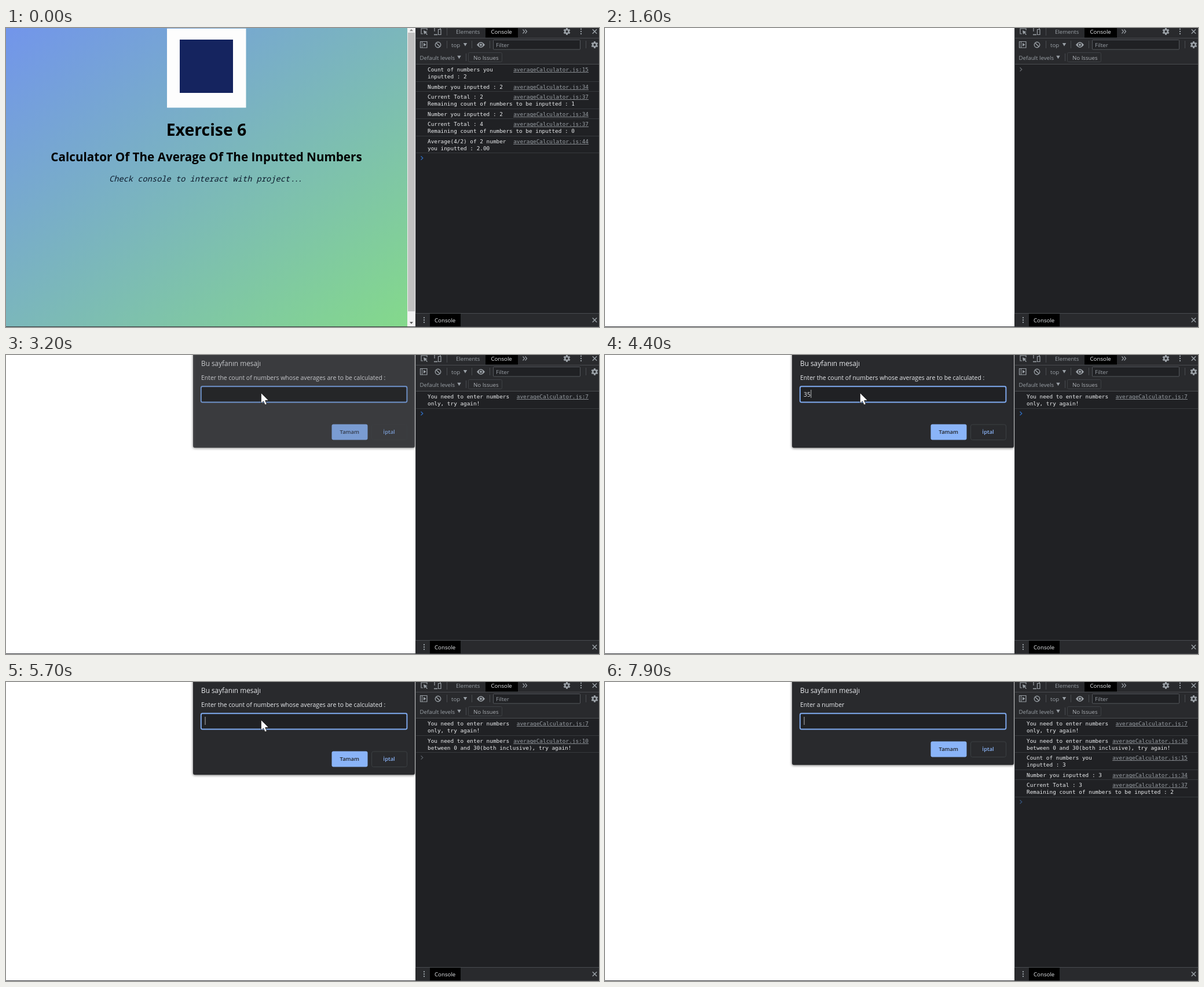
An HTML page with a canvas that plays this animation: 1024 px wide and 516 px high, repeating every 8000 ms.

```html
<!DOCTYPE html>
<html lang="en">
<head>
<meta charset="utf-8">
<title>Average calculator</title>
<style>
html, body { margin: 0; width: 100%; height: 100%; overflow: hidden; background: #fff; }
canvas { display: block; }
</style>
</head>
<body>
<canvas id="stage" width="1024" height="516"></canvas>
<script>
const ctx = document.getElementById('stage').getContext('2d');
const LOOP = 8000, STEP = 100;
const SANS = '"Open Sans", "Noto Sans", sans-serif';
const MONO = '"DejaVu Sans Mono", monospace';
const GREY = '#9aa0a6', BAR = '#292a2d', DARK = '#202124', EDGE = '#494c50', BLUE = '#8ab4f8';

// Last value in [time, value] pairs whose time has come
const at = (keys, t) => keys.reduce((v, k) => (k[0] <= t ? k[1] : v), keys[0][1]);
const mix = (a, b, p) => a + (b - a) * p;
const ease = p => p * p * (3 - 2 * p);

function rect(x, y, w, h, color) {
  ctx.fillStyle = color;
  ctx.fillRect(x, y, w, h);
}

function box(x, y, w, h, r, fill, stroke, width = 1) {
  ctx.beginPath();
  ctx.roundRect(x, y, w, h, r);
  if (fill) { ctx.fillStyle = fill; ctx.fill(); }
  if (stroke) { ctx.strokeStyle = stroke; ctx.lineWidth = width; ctx.stroke(); }
}

function text(str, x, y, color, font, align = 'left') {
  ctx.font = font;
  ctx.fillStyle = color;
  ctx.textAlign = align;
  ctx.fillText(str, x, y);
}

const label = (str, x, y, color = GREY, size = 9.7) => text(str, x, y, color, `${size}px ${SANS}`);

function line(points, color = GREY, width = 1.2) {
  ctx.beginPath();
  points.forEach(([x, y]) => ctx.lineTo(x, y));
  ctx.strokeStyle = color;
  ctx.lineWidth = width;
  ctx.stroke();
}

function shape(points, color) {
  ctx.beginPath();
  points.forEach(([x, y]) => ctx.lineTo(x, y));
  ctx.closePath();
  ctx.fillStyle = color;
  ctx.fill();
}

function ring(x, y, r, width, color = GREY) {
  ctx.beginPath();
  ctx.arc(x, y, r, 0, 7);
  ctx.strokeStyle = color;
  ctx.lineWidth = width;
  ctx.stroke();
}

function disc(x, y, r, color = GREY) {
  ctx.beginPath();
  ctx.arc(x, y, r, 0, 7);
  ctx.fillStyle = color;
  ctx.fill();
}

function gear(x, y) {
  ring(x, y, 3.3, 2.6);
  for (let i = 0; i < 6; i++) {
    const c = Math.cos(i * Math.PI / 3 + .52), s = Math.sin(i * Math.PI / 3 + .52);
    line([[x + c * 4, y + s * 4], [x + c * 6, y + s * 6]], GREY, 2.8);
  }
}

function cross(x, y) {
  line([[x - 3.7, y - 3.7], [x + 3.7, y + 3.7]], GREY, 1.5);
  line([[x + 3.7, y - 3.7], [x - 3.7, y + 3.7]], GREY, 1.5);
}

const dots = (x, y) => [-4, 0, 4].forEach(d => disc(x, y + d, 1.15));
const arrow = (x, y, w, h, color = GREY) => shape([[x - w, y - h], [x + w, y - h], [x, y + h]], color);
const divider = (x, y) => rect(x, y, 1, 13, EDGE);

function drawPage() {
  const w = 693, h = 515;
  // Corner-to-corner gradient, as CSS "to bottom right"
  const k = w * h / (w * w + h * h);
  const g = ctx.createLinearGradient(w / 2 - h * k, h / 2 - w * k, w / 2 + h * k, h / 2 + w * k);
  g.addColorStop(0, '#7295eb');
  g.addColorStop(1, '#84d98b');
  rect(0, 0, w, h, g);

  rect(278, 1, 136.5, 136.5, '#fdfdfd');
  rect(300, 20, 92, 92, '#15245f');

  text('Exercise 6', 346, 186, '#000', `bold 28.4px ${SANS}`, 'center');
  text('Calculator Of The Average Of The Inputted Numbers', 346, 230, '#000', `bold 20.66px ${SANS}`, 'center');
  const note = 'italic 13.7px "Noto Sans Mono", monospace';
  text('Check console to interact with project', 178, 265, '#0c1a2c', note);
  ctx.letterSpacing = '-2px';
  text('...', 491, 265, '#0c1a2c', note);
  ctx.letterSpacing = '0px';

  rect(693, 0, 14, 515, '#f1f1f1');
  rect(694, 8, 12, 481, '#c1c1c1');
  arrow(700, 3.5, 3, -1.7, '#8a8a8a');
  arrow(700, 509, 3, 1.7, '#505050');
}

function drawTools() {
  rect(707, 0, 317, 516, DARK);
  rect(707, 0, 317, 62, BAR);
  rect(707, 17, 317, 1, EDGE);
  rect(707, 62, 317, 1, EDGE);
  rect(707, 0, 1, 516, '#3b3e42');

  // Tab row
  line([[720, 10], [717, 10], [717, 1], [727, 1], [727, 4]]);
  shape([[721, 4], [728, 7], [725, 8], [728, 11], [727, 12], [724, 9], [722, 11]], GREY);
  line([[740, 6], [740, -1], [750, -1], [750, 2]]);
  box(746.5, 2.5, 4.5, 9, 0, null, GREY, 1.2);
  line([[739, 11.5], [745, 11.5]], GREY, 1.6);
  divider(761, 0);
  label('Elements', 777, 9.5, GREY, 9.6);
  rect(828, 0, 56, 16.5, '#000');
  label('Console', 837.5, 9.5, '#e8eaed');
  [892.5, 896.5].forEach(x => line([[x, 2.5], [x + 3, 6], [x, 9.5]]));
  gear(968.5, 6);
  dots(993, 6);
  cross(1016.5, 6);

  // Filter row
  box(715.5, 23.5, 11.5, 10.5, 0, null, GREY, 1.2);
  line([[718.5, 24], [718.5, 34]], GREY, 1);
  shape([[721, 25.8], [725.5, 28.8], [721, 31.8]], GREY);
  ring(746, 29, 4.7, 1.4);
  line([[742.7, 25.7], [749.3, 32.3]], GREY, 1.4);
  divider(761, 22);
  label('top', 769, 32.5);
  arrow(793, 28.7, 3.2, 2.7);
  divider(804, 22);
  ctx.beginPath();
  ctx.moveTo(813, 29);
  ctx.quadraticCurveTo(820, 19.5, 827, 29);
  ctx.quadraticCurveTo(820, 38.5, 813, 29);
  ctx.fillStyle = GREY;
  ctx.fill();
  ring(820, 29, 2.6, 1.2, BAR);
  divider(835, 22);
  box(841.5, 20.5, 150, 16.5, 1, DARK, '#55585d');
  label('Filter', 846, 32.5);
  divider(1001, 22);
  gear(1016.5, 29);

  // Level row
  label('Default levels', 714.5, 54.5);
  arrow(782.5, 50.5, 3.2, 2.7);
  divider(794, 44);
  box(798.5, 42.5, 58, 16, 2, null, '#3e4145');
  label('No Issues', 807, 54.5, '#a9adb2');

  // Drawer
  rect(707, 492, 317, 23, BAR);
  rect(707, 492, 317, 1, EDGE);
  dots(722, 504);
  rect(732, 493, 53, 22, '#000');
  label('Console', 740, 508, '#e8eaed');
  cross(1016.5, 504);
}

const entry = (time, row, ...lines) => ({ time, row, lines });
const count = (time, n) => entry(time, 15, 'Count of numbers you', `inputted : ${n}`);
const given = (time, n) => entry(time, 34, `Number you inputted : ${n}`);
const total = (time, n, left) =>
  entry(time, 37, `Current Total : ${n}`, `Remaining count of numbers to be inputted : ${left}`);

const BEFORE = [
  count(0, 2), given(0, 2), total(0, 2, 1), given(0, 2), total(0, 4, 0),
  entry(0, 44, 'Average(4/2) of 2 number', 'you inputted : 2.00')
];
const AFTER = [
  entry(3000, 7, 'You need to enter numbers', 'only, try again!'),
  entry(4600, 10, 'You need to enter numbers', 'between 0 and 30(both inclusive), try again!'),
  count(7100, 3), given(7700, 3), total(7700, 3, 2)
];
const PROMPT = [[0, '#2f70c8'], [1600, '#6a6e73'], [3000, '#2f70c8'], [4600, '#5a5f66'], [7100, '#36567f']];

function drawLog(t) {
  const font = `9.38px ${MONO}`;
  let y = 63;
  for (const e of t < 1600 ? BEFORE : AFTER) {
    if (e.time > t) break;
    e.lines.forEach((s, i) => text(s, 728, y + 12 + i * 12.4, '#eceef0', font));
    const link = `averageCalculator.js:${e.row}`;
    text(link, 1006, y + 12, GREY, font, 'right');
    const w = ctx.measureText(link).width;
    rect(1006 - w, Math.round(y + 13), w, 1, '#85898e');
    y += e.lines.length > 1 ? 29.5 : 17.5;
    rect(708, Math.floor(y - .5), 316, 1, '#36393d');
  }
  line([[716.5, y + 5.2], [719.8, y + 8.4], [716.5, y + 11.6]], at(PROMPT, t), 1.3);
}

const FADE = [[0, 0], [1700, .5], [1800, 1], [3100, .4], [3200, .8], [3300, 1], [4700, .5], [4800, 1], [7800, .5], [7900, 1]];
const FOCUS = [[0, true], [3000, false], [3200, true], [4600, false], [4700, true], [7700, false], [7800, true]];
const VALUE = [[0, ''], [4100, '3'], [4400, '35'], [4700, ''], [6800, '3'], [7100, ''], [7700, '3'], [7800, '']];
const CARET = [
  [0, false], [1800, true], [2200, false], [2700, true], [3000, false], [3300, true], [3700, false],
  [4100, true], [4600, false], [4800, true], [5100, false], [5700, true], [6200, false],
  [6800, true], [7400, false], [7900, true]
];

function drawDialog(t) {
  const alpha = at(FADE, t);
  if (!alpha) return;
  const focus = at(FOCUS, t), value = at(VALUE, t), second = t >= 7100;
  const lift = focus ? 0 : 1, bottom = (second ? 143 : 160) - lift / 2, top = bottom - 40.5;

  ctx.save();
  ctx.globalAlpha = alpha;
  ctx.beginPath();
  ctx.rect(0, 0, 707, 516);
  ctx.clip();
  ctx.save();
  ctx.shadowColor = 'rgba(0,0,0,.6)';
  ctx.shadowBlur = 4;
  ctx.shadowOffsetY = 1;
  box(323, -10, 383, bottom + 10, 3, BAR);
  ctx.restore();

  label('Bu sayfanın mesajı', 337, 19 - lift, '#e8eaed', 11.8);
  const ask = second ? 'Enter a number' : 'Enter the count of numbers whose averages are to be calculated :';
  label(ask, 337, 43 - lift, '#e8eaed', 10.45);

  if (focus) box(336.8, 54.3, 355.6, 27.2, 2.5, DARK, '#80acf2', 1.9);
  else box(337, 54, 355, 27, 2, DARK);
  label(value, 343, 71.5 - lift / 2, '#e8eaed', 10.4);
  if (at(CARET, t)) rect(343.5 + value.length * 5.9, 60, 1, 14, '#b5b8bb');

  const bold = `600 9.4px ${SANS}`;
  box(562.5, top, 62, 27, 3, BLUE);
  text('Tamam', 593.3, top + 16.8, DARK, bold, 'center');
  box(631.5, top + .5, 61, 26.5, 3, null, '#3c4043');
  text('İptal', 661.5, top + 16.8, BLUE, bold, 'center');
  ctx.restore();
}

function pointer(t) {
  if (t >= 100 && t < 600) {
    const p = Math.min(1, (t - 100) / 300);
    return [mix(355, 481, ease(p)), mix(473, 286, p)];
  }
  if (t >= 600 && t < 1400) {
    const p = ease((t - 500) / 900);
    return [mix(479, 74, p), mix(284, -14, p)];
  }
  if (t >= 1700 && t < 2400) {
    const p = ease(Math.min(1, (t - 1600) / 600));
    return [mix(80, 441, p), mix(-14, 53, p)];
  }
  return t >= 3000 && t < 6600 ? [440, 65] : null;
}

function drawPointer(t) {
  const pos = pointer(t);
  if (!pos) return;
  ctx.save();
  ctx.translate(...pos);
  const tip = [[.5, .5], [.5, 18.5], [4.5, 14.8], [7.3, 21], [10.3, 19.7], [7.6, 13.6], [13.3, 13.3]];
  shape(tip, '#fff');
  line([...tip, tip[0]], '#111', .7);
  ctx.restore();
}

function frame(now) {
  const t = Math.floor(now % LOOP / STEP) * STEP;
  rect(0, 0, 1024, 516, '#fff');
  if (t < 1600) drawPage();
  drawTools();
  drawLog(t);
  drawDialog(t);
  rect(0, 515, 1024, 1, '#3a3c40');
  drawPointer(t);
  requestAnimationFrame(frame);
}
requestAnimationFrame(frame);
</script>
</body>
</html>
```
